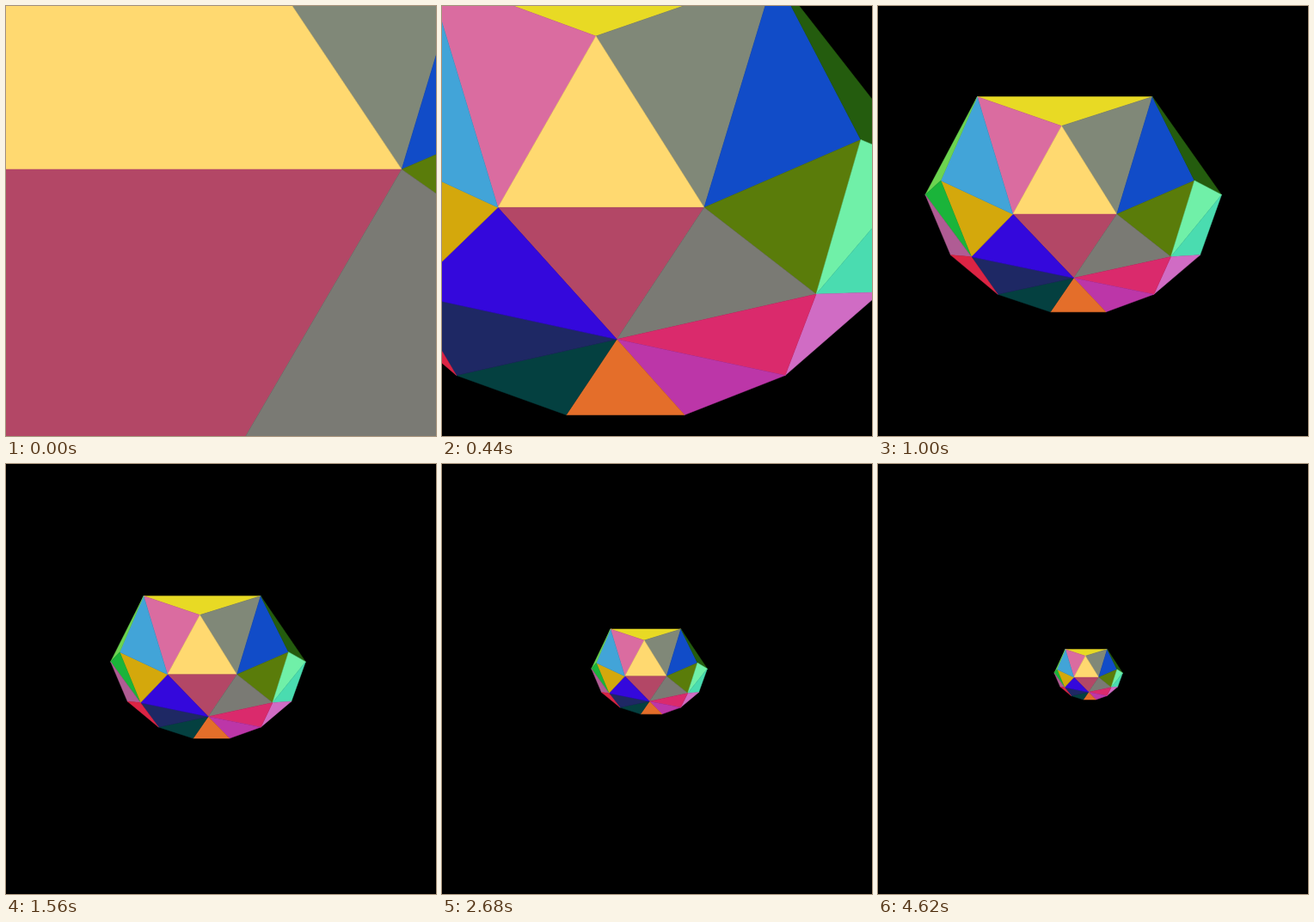
These frames come from a looping animation (500 by 500 pixels, 4.64 s). An HTML page with a canvas:

```html
<!DOCTYPE html>
<html>
<head>
<meta charset="utf-8">
<title>Receding polyhedron</title>
<style>
  html, body { margin: 0; width: 100%; height: 100%; overflow: hidden; background: #000; }
  canvas { display: block; }
</style>
</head>
<body>
<canvas id="stage" width="500" height="500"></canvas>
<script>
const ctx = document.getElementById('stage').getContext('2d');
const LOOP = 4640;

// x, y and starting depth; depth grows by one each step
const vertices = {
  A: [-902, -2731, 3.7],
  B: [-2253, -191, 3.18],  C: [668, -191, 3.18],
  D: [-521, 1534, 2.15],
  E: [-3255, -3497, 3.2],  F: [1670, -3497, 3.2],
  P: [-4230, -1125, 2.9],  G: [2820, -1125, 2.9],
  O: [-3325, 978, 2.5],    H: [2128, 978, 2.5],
  Q: [-4505, -705, 2.1],   I: [3453, -705, 2.1],
  R: [-3807, 911, 2],      J: [2864, 911, 2],
  N: [-2531, 1948, 1.85],  K: [1617, 1948, 1.85],
  M: [-1118, 2390, 1.6],   L: [339, 2390, 1.6]
};

const faces = {
  EFA: '#e8da24', EAB: '#da6ca0', AFC: '#808878', ABC: '#ffd970',
  FCG: '#114cc8', FIG: '#245c0e', CGH: '#5a7c0a', GIH: '#70f0a8',
  IJH: '#4adcb0', HKJ: '#d06cc4', BCD: '#b34766', CDH: '#7a7a74',
  DHK: '#da2a6c', DLK: '#bc36a8', MDL: '#e46e2a', NDM: '#044040',
  ODN: '#1e2864', BOD: '#3408dc', PBO: '#d4a80c', EPB: '#42a4d8',
  EQP: '#6cd450', PQO: '#1ab43a', QRO: '#b05c94', RON: '#dc2444'
};

// Three steps every 140 ms: two short ones, then a hold
function stepAt(time) {
  const t = time + 20;
  return Math.max(0, 3 * Math.floor(t / 140) + Math.min(2, Math.floor(t % 140 / 20)) - 2);
}

function project(name, step) {
  const [x, y, z] = vertices[name];
  return [250 + x / (z + step), 250 + y / (z + step)];
}

function draw(now) {
  const step = stepAt(now % LOOP);
  ctx.fillStyle = '#000';
  ctx.fillRect(0, 0, 500, 500);
  ctx.lineWidth = 0.5; // closes seams between faces
  ctx.lineJoin = 'round';
  for (const [corners, color] of Object.entries(faces)) {
    ctx.beginPath();
    for (const name of corners) ctx.lineTo(...project(name, step));
    ctx.closePath();
    ctx.fillStyle = ctx.strokeStyle = color;
    ctx.fill();
    ctx.stroke();
  }
}

const start = performance.now();
function tick() {
  draw(performance.now() - start);
  requestAnimationFrame(tick);
}
tick();
</script>
</body>
</html>
```
